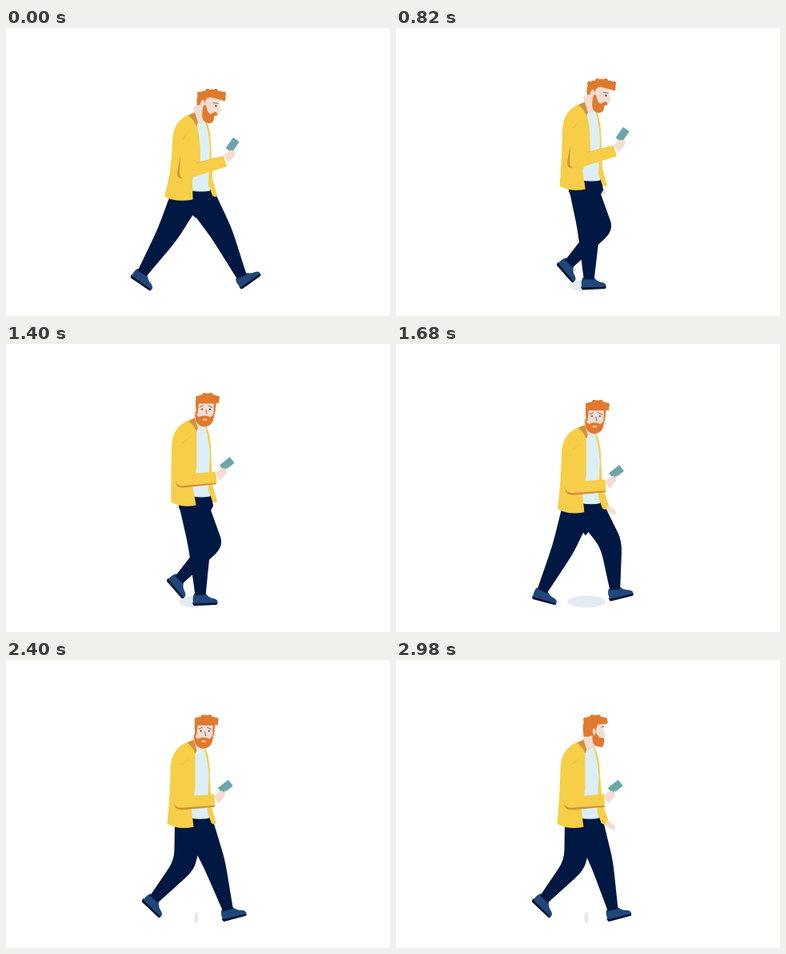
An HTML page for the animation above (3000 ms loop, 480x360 px).

```html
<!DOCTYPE html>
<html lang="en">
<head>
<meta charset="utf-8">
<title>Walking with a phone</title>
<style>
  html, body { margin: 0; width: 100%; height: 100%; overflow: hidden; background: #fff; }
  svg { display: block; width: 100vw; height: 100vh; }
  .navy { fill: #011843; }
  .yellow { fill: #f6ce48; }
  .shade { fill: #cf923c; }
  .skin { fill: #f2ddd2; }
  .hair { fill: #df7a2e; }
  .shirt { fill: #dceff7; }
  .line { fill: none; stroke: #6a4a3c; stroke-width: .8; stroke-linecap: round; }
  .eye { fill: #33303a; }
</style>
</head>
<body>
<svg viewBox="0 0 480 360" xmlns="http://www.w3.org/2000/svg">
  <defs>
    <g id="shoe">
      <path fill="#21467a" d="M-8-2L6-3Q10 3 17 4Q23 6 21 11L-8 12Q-11 4-8-2Z"/>
      <path fill="#08152f" d="M-10 8L-8 10L21 9.5Q22 11 20 12L-8 13Q-10 12-10 8Z"/>
    </g>
  </defs>

  <ellipse id="shadow" cx="238" cy="322" ry="7.5" fill="#e4ebf2"/>

  <g id="farArm">
    <path class="skin" d="M258 198L264 199L275 208Q277 213 274 214L264 209L259 205Z"/>
    <path class="yellow" d="M240 135L254 135L259 180L267 202L260 206L250 185Z"/>
  </g>

  <use id="shoe2" href="#shoe"/>
  <path id="leg2" class="navy"/>
  <use id="shoe1" href="#shoe"/>
  <path id="leg1" class="navy"/>
  <path id="pelvis" class="navy"/>

  <g id="upper">
    <path class="skin" d="M235 97L249 97L251 116L243 122L235 110Z"/>
    <path class="shirt" d="M236 112L243 119L249 114Q256 128 256 160L257 190L255 203Q244 205 232 203L233 160Z"/>
    <path class="yellow" d="M247 111Q256 120 256.500 150L258 188L264 209Q262 212 258 209L253 195L255 150Q253 125 247 111Z"/>
    <path id="jacket" class="yellow"/>
    <path class="shade" d="M231 107L236 105L240 118L238 122Q235 114 228 109Z"/>
    <path id="fold" class="shade"/>
    <path id="sleeve" class="yellow"/>
    <rect id="phone" x="-8" y="-4.800" width="16.500" height="9.600" rx="1" fill="#6ba7a9"/>
    <path id="hand" class="skin" d="M272 159L279 153L283 152L284 154L287 151L286 159L278 168Z"/>

    <g id="down">
      <path class="skin" d="M246 88L256 84L267 91L267 97L269 102L265 108L248 108Z"/>
      <path class="hair" d="M247 96C244 108 244 117 253 118.500C259 119 260 115 260 110L265 108L262 104L256 107C252 106 251 100 250 96Z"/>
      <path class="hair" d="M239 97C237 86 240 80 248 79L272 80Q276 84 274 91L266 89L256 86Q250 86 249 92L246 98Q242 94 239 97Z"/>
      <ellipse class="skin" cx="245.500" cy="94" rx="2.500" ry="4.500" transform="rotate(15 245.500 94)"/>
      <circle class="eye" cx="262.500" cy="97" r="1.100"/>
      <path class="line" d="M259 93L265 94"/>
    </g>

    <g id="ahead" transform="translate(1.500 0)">
      <path class="skin" d="M247 88L259 85L260 95L262 100L258 106L248 104Z"/>
      <path class="hair" d="M246 96C244 111 248 114 258 114Q261 110 260 103L254 102L249 95Z"/>
      <path class="hair" d="M235 101C232 86 234 79 242 78L262 79Q266 81 264 85L252 86L248 99L241 101Z"/>
      <path class="skin" d="M247 90Q251 94 248 100Q244 95 247 90Z"/>
      <path class="line" d="M257 89L260 88.500"/>
    </g>

    <g id="front" transform="translate(0 1)">
      <path class="skin" d="M239 84H262V102Q250 116 239 104Z"/>
      <path class="hair" d="M237 86Q236 78 245 77L262 77Q268 79 266 86L263 85L261 99L259.500 99L260 86L241 86L239.500 99L237.500 99Z"/>
      <path class="hair" d="M236.500 97C236 110 240 114 248 115C257 114 260 109 260 98L256 103Q248 99 240.500 103Z"/>
      <ellipse cx="248.500" cy="106" rx="3" ry="1.300" fill="#f0c4a8"/>
      <path class="line" d="M242 90.500L246.500 88.500M253 88.500L258 91M250 94L251 99"/>
      <circle class="eye" cx="245" cy="93" r="1"/>
      <circle class="eye" cx="255" cy="93" r="1"/>
    </g>
  </g>
</svg>

<script>
const LOOP = 3000, STEP = 580;
const { PI, sin, cos, max, min, hypot } = Math;
const el = {};
document.querySelectorAll('svg [id]').forEach(e => el[e.id] = e);

const set = (id, name, value) => el[id].setAttribute(name, value);
const mix = (a, b, k) => a + (b - a) * k;
const mixPt = (a, b, k) => [mix(a[0], b[0], k), mix(a[1], b[1], k)];
const shift = (a, d, s = 1) => [a[0] + d[0] * s, a[1] + d[1] * s];
const pt = p => p[0].toFixed(2) + ' ' + p[1].toFixed(2);
const ease = (t, a, b) => {
  const k = min(1, max(0, (t - a) / (b - a)));
  return k * k * (3 - 2 * k);
};

// Unit vector across the line from a to b
function across(a, b) {
  const dx = b[0] - a[0], dy = b[1] - a[1], l = hypot(dx, dy);
  return [-dy / l, dx / l];
}

// Tapered outline around a bent limb, rounded at the joint
function limb(a, joint, b, wa, wj, wb) {
  const n = across(a, b), end = across(joint, b);
  const edge = s => [shift(a, n, wa * s), shift(joint, n, wj * s), shift(b, end, wb * s)];
  const bend = (p, q, r) => `${pt(p)}L${pt(mixPt(p, q, .75))}Q${pt(q)} ${pt(mixPt(q, r, .25))}L${pt(r)}`;
  return `M${bend(...edge(1))}L${bend(...edge(-1).reverse())}Z`;
}

// Foot on the ground sliding back; s runs from 0 to 1
const stance = s => ({
  x: mix(295, 170, s),
  y: 311 - 4 * s + 5 * sin(PI * s),
  turn: 34 * (2 * s - 1) ** 3,
  bend: 3
});
// Foot lifted and carried forward
const swing = s => ({
  x: mix(170, 295, s) - 6 * sin(PI * s),
  y: mix(307, 311, s) - 14 * sin(PI * s ** .8),
  turn: mix(36, -33, s) + 45 * sin(PI * s),
  bend: 3 + 30 * sin(PI * s)
});

function drawLeg(n, t, waist, reach) {
  const u = t / STEP % 2;
  const { x, y, turn, bend } = u < 1 ? stance(u) : swing(u - 1);
  const ankle = [x - reach * max(0, cos(PI * u)), y];
  const hip = [233 + (x - 232) * .17 + bend * .2, waist + 11];
  const knee = shift(mixPt(hip, ankle, .45), across(hip, ankle), -bend);
  set('leg' + n, 'd', limb(hip, knee, ankle, 19, 14, 6.5));
  set('shoe' + n, 'transform', `translate(${pt(ankle)}) rotate(${turn})`);
}

// k goes from the phone held up to the phone held low
function drawArm(k) {
  const shoulder = [226, 132];
  const elbow = mixPt([224, 181], [220, 183], k);
  const wrist = mixPt([274, 166], [262, 180], k);
  const d = mixPt([-4, 0], [0, 3], k);
  set('sleeve', 'd', limb(shoulder, elbow, wrist, 13, 13, 7));
  set('fold', 'd', limb(shoulder, shift(elbow, d), shift(wrist, d), 7, 13, 6));
  set('hand', 'transform', `translate(${-11 * k} ${16.5 * k})`);
  set('phone', 'transform',
    `translate(${283 - 7.5 * k} ${146 + 18 * k}) rotate(${mix(-55, -38, k)})`);
}

function drawHead(t, k) {
  const view = t < 1290 ? 'down' : t < 1400 || t >= 2890 ? 'ahead' : 'front';
  for (const v of ['down', 'ahead', 'front']) {
    set(v, 'visibility', v === view ? 'visible' : 'hidden');
  }
  set('down', 'transform', `translate(${-6 * k} ${-k}) rotate(${-12 * k} 243 105)`);
}

function draw(t) {
  const s = t / STEP % 1, lift = sin(PI * s);
  const rise = 13.5 * lift, waist = 203.5 - rise;
  const k = ease(t, 1200, 1440);
  const y = d => (waist + d).toFixed(2);

  set('shadow', 'rx', 42 * sin(PI * s * s));

  drawLeg(1, t, waist, 0);
  drawLeg(2, t + STEP, waist, 7);
  set('pelvis', 'd', `M216 ${y(0)}L257 ${y(-2)}L259 ${y(12)}L237 ${y(34 + 20 * lift)}L216 ${y(14)}Z`);

  const armTurn = 14 * (1 + cos(PI * t / STEP));
  set('farArm', 'transform', `translate(0 ${4 - rise}) rotate(${armTurn} 246 135)`);

  set('upper', 'transform', `translate(${-1.5 * ease(t, 1500, 2600)} ${.5 - rise})`);
  const hem = 198 + .5 * rise + 2 * k, open = 243 - 5 * k, back = 208 - k;
  set('jacket', 'd', `M234 106Q${back} 113 ${back} 142Q${back - 1} 180 ${hem} 210`
    + `Q${hem + 14} 218 ${mix(hem + 34, 235, .5)} 214L233 190L${open} 167Q${open} 135 238 118Z`);
  drawArm(k);
  drawHead(t, k);
}

// Curls along the top of each hairstyle
function curls(id, x0, x1, y) {
  for (let i = 0; i < 7; i++) {
    const u = i / 6, c = document.createElementNS('http://www.w3.org/2000/svg', 'circle');
    c.setAttribute('class', 'hair');
    c.setAttribute('cx', mix(x0, x1, u));
    c.setAttribute('cy', y - 4 * sin(PI * u) + i % 2);
    c.setAttribute('r', 3);
    el[id].append(c);
  }
}
curls('down', 242, 272, 82);
curls('ahead', 237, 261, 80);
curls('front', 240, 264, 79);

const start = performance.now();
function tick(now) {
  draw(max(0, now - start) % LOOP);
  requestAnimationFrame(tick);
}
draw(0);
requestAnimationFrame(tick);
</script>
</body>
</html>
```
